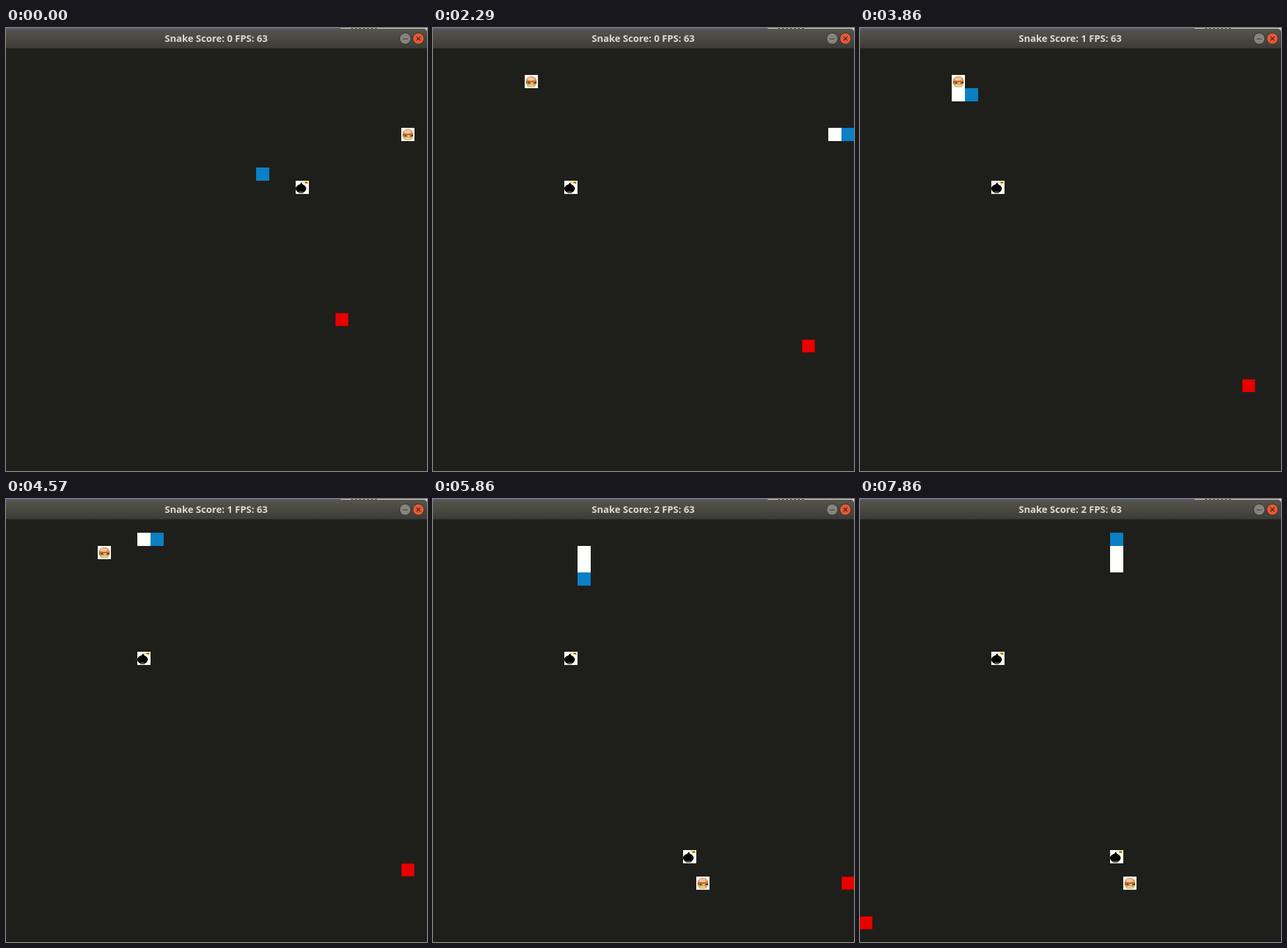
Animation, 638 px wide and 670 px high, one loop 8000 ms. Source, as an HTML page with a canvas:

```html
<!DOCTYPE html>
<html lang="en">
<head>
<meta charset="utf-8">
<title>Snake</title>
<style>
  html, body { margin: 0; width: 100%; height: 100%; overflow: hidden; background: #1e1f1b; }
  canvas { display: block; }
</style>
</head>
<body>
<canvas id="stage" width="638" height="670"></canvas>
<script>
const ctx = document.getElementById('stage').getContext('2d');
const LOOP = 8000, TICKS = 56, GRID = 32, CELL = 20;
const DIRS = { U: [0, -1], D: [0, 1], L: [-1, 0], R: [1, 0] };

// Cells visited by a walker, wrapping around the board.
function walk(start, moves) {
  const cells = [start];
  for (const m of moves) {
    const [x, y] = cells[cells.length - 1], [dx, dy] = DIRS[m];
    cells.push([(x + dx + GRID) % GRID, y + dy]);
  }
  return cells;
}

const snakePath = walk([19, 10],
  'U' + 'R'.repeat(4) + 'UU' + 'R'.repeat(12) + 'UUU' + 'R'.repeat(5) + 'UURRR' +
  'LLLLD' + 'RRRRDDD' + 'R'.repeat(8) + 'UUUU');
const enemyPath = walk([25, 21], 'DRDRRDRDDRDRDDRDD');
const enemyTicks = [3, 6, 10, 13, 16, 18, 20, 22, 25, 28, 31, 34, 38, 42, 46, 51, 54];
const pauses = [5, 8, 26, 51];      // ticks without a snake move
const doubles = [6, 25, 27, 35, 39]; // ticks with two snake moves
const MEALS = [15, 36], SCORE_TICKS = [17, 37];

const passed = (list, tick) => list.filter(t => t <= tick).length;

function box(x, y, w, h, color) {
  ctx.fillStyle = color;
  ctx.fillRect(x, y, w, h);
}

function oval(x, y, rx, ry, color, from = 0, to = 2 * Math.PI) {
  ctx.fillStyle = color;
  ctx.beginPath();
  ctx.ellipse(x, y, rx, ry, 0, from, to);
  ctx.fill();
}

function shape(points, color) {
  ctx.fillStyle = color;
  ctx.beginPath();
  points.forEach(([x, y]) => ctx.lineTo(x, y));
  ctx.fill();
}

function line(x1, y1, x2, y2, color, width = 1) {
  ctx.strokeStyle = color;
  ctx.lineWidth = width;
  ctx.beginPath();
  ctx.moveTo(x1, y1);
  ctx.lineTo(x2, y2);
  ctx.stroke();
}

function inCell([c, r], draw) {
  ctx.save();
  ctx.translate(c * CELL - 1, r * CELL + 11);
  draw();
  ctx.restore();
}

const block = color => () => box(0, 0, CELL, CELL, color);

function enemy() {
  box(0, 0, CELL, CELL, '#b00000');
  box(1, 1, CELL - 2, CELL - 2, '#e80000');
}

function bomb() {
  box(0, 0, CELL, CELL, '#fffffb');
  oval(8, 12, 8, 6.5, '#000');
  shape([[3, 8], [7, 5], [8, 3], [9, 3], [10, 5], [14, 8]], '#000');
  oval(8, 17.5, 4, 1.5, '#555');
  line(9, 4, 11, 2, '#999');
  shape([[10, 1], [18, 0], [19, 5], [16, 4]], '#f3e04a');
  box(14, 2, 4, 2, '#8a6500');
}

function burger() {
  box(0, 0, CELL, CELL, '#fffff8');
  oval(10, 14, 7.5, 4.2, '#d9a860');
  oval(10, 9, 8.3, 7, '#d99a62', Math.PI, 0);
  oval(9.5, 6, 5, 2.4, '#f0c9a0');
  box(2, 9, 16, 2, '#c65a3a');
  box(2, 11, 16, 2, '#5b3520');
  shape([[2, 11], [6, 11], [4, 14]], '#86a044');
  shape([[7, 11], [15, 11], [11, 14]], '#e8c552');
  oval(10, 16, 4, 1.2, '#ecd296');
  line(4, 18, 16, 18, '#b9c49a');
}

function button(x, color) {
  oval(x, 16, 9, 9, '#33322d');
  oval(x, 16, 8, 8, color);
}

function titleBar(score) {
  box(0, 0, 507, 6, '#5252a0');
  box(507, 0, 131, 6, '#d8d6d2');
  for (let x = 523; x < 563; x += 6) box(x, 0, 3, 1, '#55534f');
  const shade = ctx.createLinearGradient(0, 1, 0, 31);
  shade.addColorStop(0, '#5b5a51');
  shade.addColorStop(0.1, '#53524a');
  shade.addColorStop(1, '#3c3b36');
  ctx.fillStyle = shade;
  ctx.beginPath();
  ctx.roundRect(0, 1, 638, 30, [5, 5, 0, 0]);
  ctx.fill();
  box(0, 30, 638, 1, '#30302b');
  ctx.font = 'bold 14.5px "Open Sans", "Noto Sans", sans-serif';
  ctx.textAlign = 'center';
  ctx.fillStyle = '#dfdbd2';
  ctx.fillText(`Snake Score: ${score} FPS: 63`, 318.5, 21);
  button(605, '#85837a');
  line(601, 16.5, 609, 16.5, '#3c3b37');
  button(625, '#e65a35');
  line(622, 13, 628, 19, '#492218', 1.2);
  line(628, 13, 622, 19, '#492218', 1.2);
}

function render(tick) {
  const meals = passed(MEALS, tick);
  const head = tick - passed(pauses, tick) + passed(doubles, tick);
  box(0, 0, 638, 670, '#1e1f1b');
  inCell(meals ? [10, 11] : [22, 11], bomb);
  if (meals > 1) inCell([19, 26], bomb);
  inCell([[30, 7], [7, 3], [20, 28]][meals], burger);
  for (let i = meals; i >= 0; i--) {
    inCell(snakePath[head - i], block(i ? '#fffffb' : '#0b80c4'));
  }
  inCell(enemyPath[passed(enemyTicks, tick)], enemy);
  titleBar(passed(SCORE_TICKS, tick));
}

function loop() {
  const t = performance.now() % LOOP;
  render(Math.min(TICKS - 1, Math.floor((t + 5) * TICKS / LOOP)));
  requestAnimationFrame(loop);
}
loop();
</script>
</body>
</html>
```
